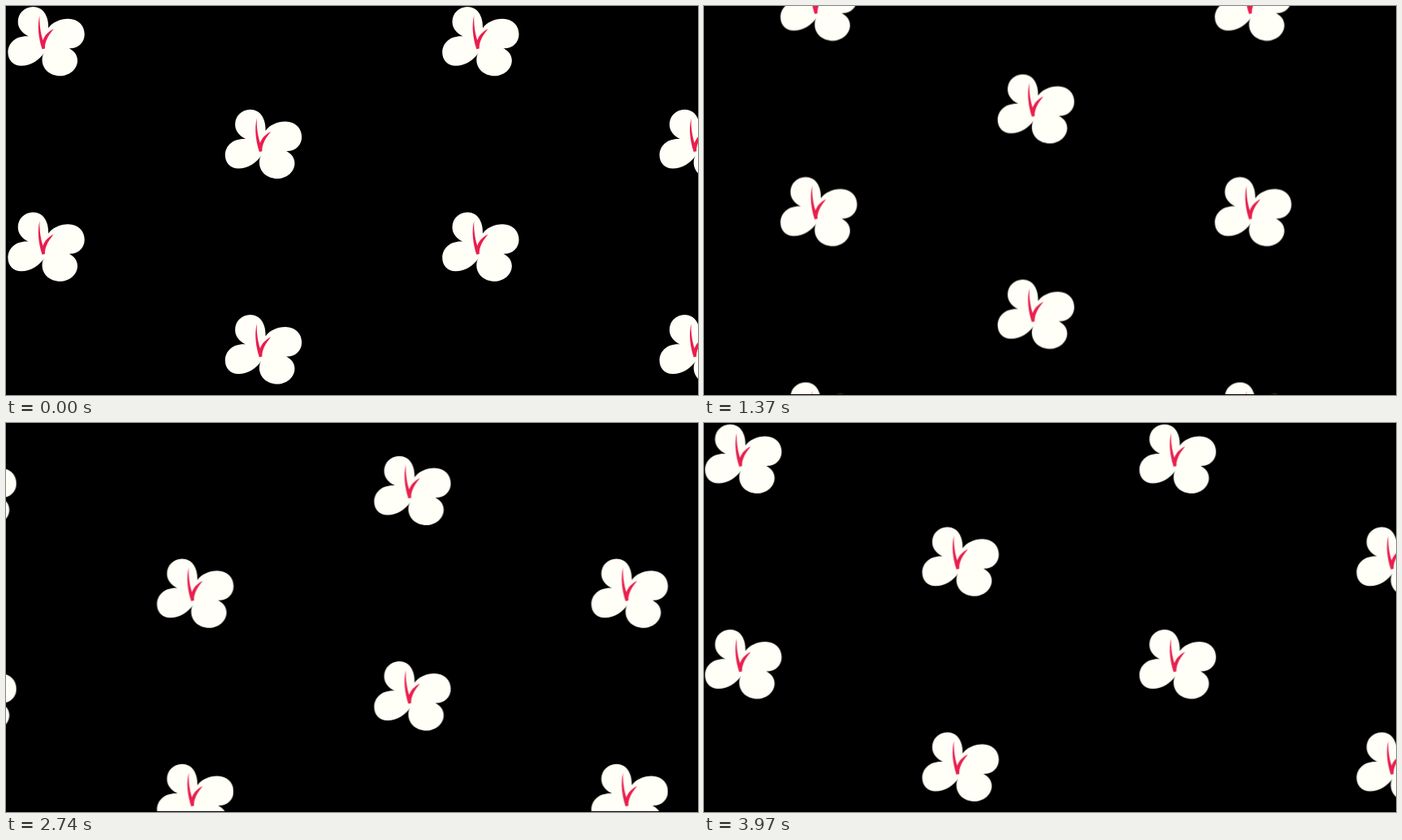
An HTML page that plays this animation: 852x480 px, repeating every 4 s.

```html
<!DOCTYPE html>
<html lang="en">
<head>
<meta charset="utf-8">
<title>Drifting flowers</title>
<style>
  html, body { margin: 0; width: 100%; height: 100%; overflow: hidden; background: #000; }
  svg { display: block; width: 852px; height: 480px; }
  #field { animation: drift 4s steps(120, end) -4ms infinite; }
  /* Slightly more than one half-tile, so the wrap is a short step */
  @keyframes drift {
    from { transform: translate(0, 0); }
    to { transform: translate(268.52px, -127.23px); }
  }
</style>
</head>
<body>
<svg viewBox="0 0 852 480">
  <defs>
    <g id="flower">
      <path fill="#fffef7" d="M26 37C18 33 13 27 13 19C13 9 21 .7 31.5 .7C44 .7 51 12 50.5 27
        C55 20 65 15.5 75 15.5C87 15.5 95 24 95 34.5C95 45 87 52.5 76 52
        C82 55 86.3 60 86.3 67C86.3 78 76 86 65 86C52 86 42.8 77 42.8 66C42.8 63 43.5 60 45 57.5
        C40 66 29 73.5 17 73.5C7 73.5 .7 66 .7 57C.7 45 11 36 26 37Z"/>
      <path fill="#e81f4e" d="M39.8 11.5C36.4 24 38.5 40 42.8 53L46.3 52.2
        C46 46 48 39 57 28C50 31.5 46 36 43.8 42C41 33 39.2 22 39.8 11.5Z"/>
    </g>
  </defs>
  <g id="field"></g>
  <rect y="479" width="852" height="1"/>
</svg>
<script>
  const field = document.getElementById('field');
  const stepX = 267.4, stepY = 126.7;

  for (let row = 0; row <= 4; row++) {
    for (let col = -1; col <= 3; col++) {
      if ((row + col) % 2) continue;
      const use = document.createElementNS('http://www.w3.org/2000/svg', 'use');
      use.setAttribute('href', '#flower');
      use.setAttribute('x', 1.7 + col * stepX);
      use.setAttribute('y', 0.3 + row * stepY);
      field.append(use);
    }
  }
</script>
</body>
</html>
```
